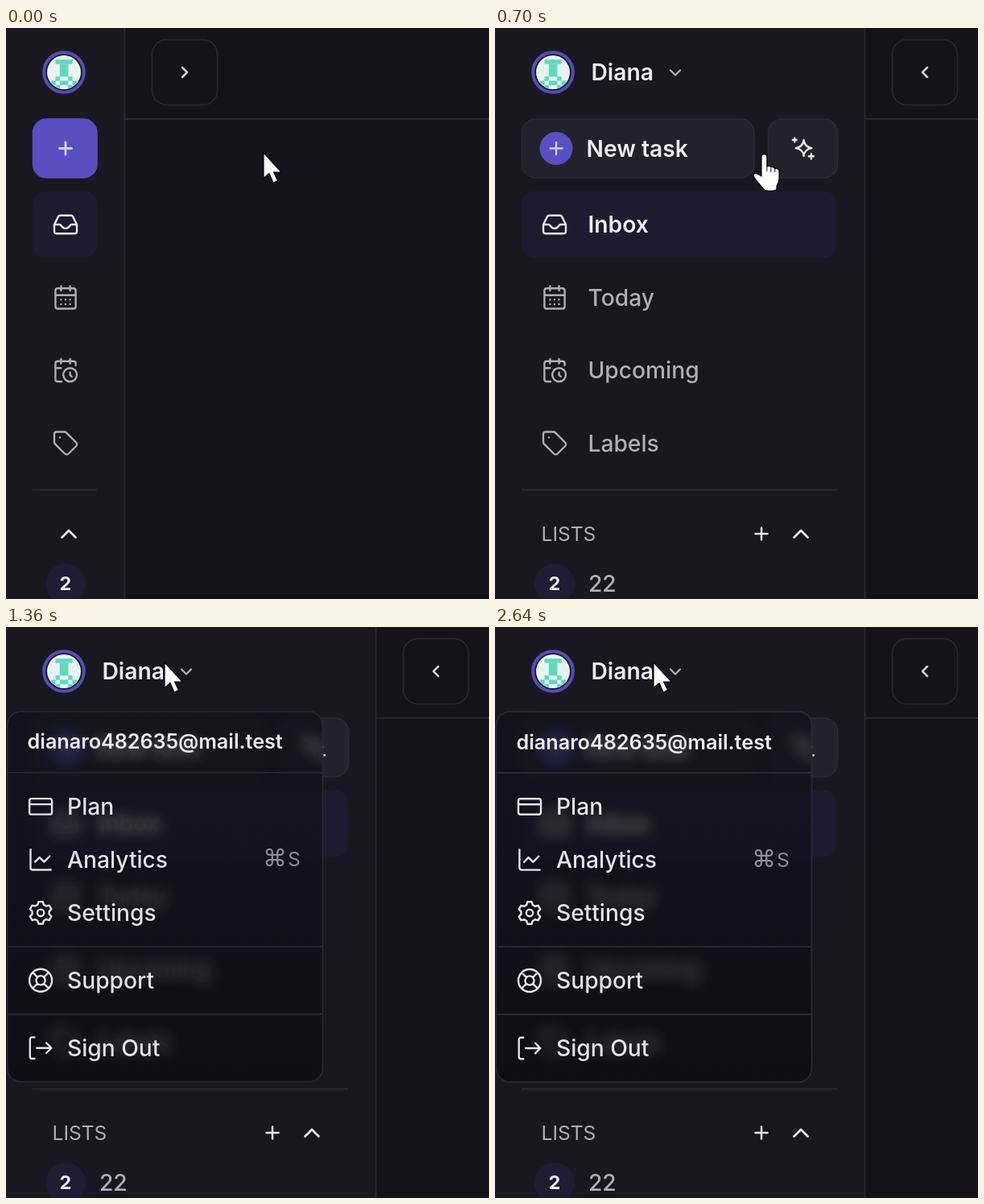
Animation of 600 by 709 pixels, one loop 2670 ms. Source, as an HTML page:

```html
<!DOCTYPE html>
<html lang="en">
<head>
<meta charset="utf-8">
<title>Sidebar</title>
<style>
html, body { margin: 0; width: 100%; height: 100%; overflow: hidden; background: #14131b; }
svg { display: block; width: 100vw; height: 100vh; }
text { font-family: Inter, "Noto Sans", sans-serif; font-size: 28.2px; font-weight: 500; fill: #b0afb8; white-space: pre; }
.hi { fill: #ececf1; }
.bold { font-weight: 600; }
.line { stroke: #2a2934; stroke-width: 1.8; }
.ico { fill: none; stroke: #b0afb8; stroke-width: 1.7; stroke-linecap: round; stroke-linejoin: round; }
.lit { stroke: #e6e6ec; }
.small { font-size: 24.6px; font-weight: 400; }
.card { fill: #24222d; stroke: #2b2a36; stroke-width: 1.5; }
</style>
</head>
<body>
<svg viewBox="0 0 600 709" preserveAspectRatio="none">
  <defs>
    <clipPath id="face"><circle r="21"/></clipPath>
    <clipPath id="panel"><rect x="1" y="105" width="393" height="460" rx="17"/></clipPath>
    <filter id="blur" filterUnits="userSpaceOnUse" x="0" y="0" width="600" height="709"><feGaussianBlur stdDeviation="7"/></filter>
    <linearGradient id="shade" gradientUnits="userSpaceOnUse" x1="0" x2="0" y1="105" y2="565">
      <stop stop-color="#12111a"/><stop offset=".5" stop-color="#110f18"/><stop offset="1" stop-color="#0d0c14"/>
    </linearGradient>
  </defs>
  <rect width="600" height="709" fill="#14131b"/>
  <g id="side">
    <rect id="bar" height="709" fill="#191821"/>
    <line id="edge" class="line" y2="709"/>
    <line id="head" class="line" x2="600" y1="113" y2="113"/>
    <rect id="hover" x="33" y="14" width="219.5" height="82.5" rx="15" fill="#282633"/>
    <g id="avatar"></g>
    <circle id="dot" cy="55" fill="none" stroke="#554db5" stroke-width="4"/>
    <g id="name" class="open">
      <text class="hi bold" y="65">Diana</text>
      <path class="ico" style="stroke-width:2.3" d="M98.5 52.5l6 6 6-6"/>
    </g>
    <rect id="task" x="33.5" y="113" height="73" rx="17" stroke-width="1.5"/>
    <circle class="open" cx="76" cy="149.5" r="20.5" fill="#594fc1"/>
    <path id="plus" class="ico" style="stroke:#d5d1f3" d="M-7.5 0h15M0 -7.5v15"/>
    <text class="hi bold open" x="113.5" y="159.5">New task</text>
    <g id="spark" class="open">
      <rect class="card" y="113" width="86" height="73" rx="17"/>
      <path class="ico lit" transform="translate(43.5 149.5) scale(1.4) translate(-12 -12)"
        d="M12.4 4.5q.8 6.2 7 7.2-6.2 .8-7 7-.8-6.2-7-7 6.2-1 7-7.2zM4.3 2.8v3.4M2.6 4.5h3.4M19 16.8v4.4M16.8 19h4.4"/>
    </g>
    <rect id="inbox" x="33" y="202.5" height="83" rx="17" fill="#1e1b30"/>
    <g id="rows"></g>
    <line id="rule" class="line" x1="33" y1="573.5" y2="573.5"/>
    <text class="small open" x="57.5" y="636.5">LISTS</text>
    <path id="add" class="ico lit open" style="stroke-width:2.5" d="M-7.5 0h15M0 -7.5v15"/>
    <path id="fold" class="ico lit" style="stroke-width:2.8" d="M-8.5 4.5l8.5-8.5 8.5 8.5"/>
    <circle cx="74" cy="690" r="25" fill="#1f1c33"/>
    <text class="hi" x="74" y="698" text-anchor="middle" style="font-size:23.5px;font-weight:700">2</text>
    <text class="open" x="116" y="700">22</text>
  </g>
  <g id="toggle">
    <rect x="34" y="14.5" width="81" height="81" rx="18" fill="none" stroke="#282731" stroke-width="1.8"/>
    <path id="arrow" class="ico" style="stroke:#d0d0d7;stroke-width:2.5" d="M-3 -6l6 6-6 6"/>
  </g>
  <g id="menu">
    <g clip-path="url(#panel)">
      <rect width="600" height="709" fill="#191821"/>
      <use href="#side" filter="url(#blur)"/>
      <rect width="600" height="709" fill="url(#shade)" opacity=".77"/>
    </g>
    <rect x="1.5" y="105" width="392" height="460" rx="17" fill="none" class="line"/>
    <path class="line" d="M2 181h391M2 397h391M2 481h391"/>
    <text class="hi bold" x="26.5" y="151.5" style="font-size:25.2px">dianaro482635@mail.test</text>
    <text class="small" y="297.5" style="fill:#8f8e98"><tspan x="319" style="font-size:30px">⌘</tspan><tspan x="350">S</tspan></text>
    <g id="items"></g>
  </g>
  <g id="cursor" stroke-linejoin="round">
    <path id="pointer" d="M0 -2V29.5L7 23.5 12 35 17.5 32.5 12.5 22H22Z" fill="#fff" stroke="#0b0b10" stroke-width="1.2"/>
    <g id="hand">
      <path fill="#fff" stroke="#0b0b10" stroke-width="1.2" d="M11 27V3a3.4 3.4 0 0 1 6.8 0V15q3-1.8 5 1 3.2-1.2 4.8 1.6 4.6-1 5.4 3.2v9q0 5-3 9v3.5q0 3-8.5 3-7 0-9-3.5-4-5-9-11-3.5-5-1.8-6.5 2.6-2 9.3 2.7z"/>
      <path fill="none" stroke="#33323c" stroke-width="1.2" d="M17.8 15v6M22.8 17v5M27.6 18v4"/>
    </g>
  </g>
</svg>
<script>
const LOOP = 2670, OPEN = 296, OPEN_MS = 365, CLICK = 1240;
const $ = id => document.getElementById(id);
const set = (id, attrs) => { for (const k in attrs) $(id).setAttribute(k, attrs[k]); };
const show = (el, on) => { el.style.display = on ? "" : "none"; };
const ramp = (t, a, b) => Math.min(1, Math.max(0, (t - a) / (b - a)));
const mix = (a, b, k) => a + (b - a) * k;

// cubic-bezier(.4, 0, .2, 1)
function ease(x) {
  let lo = 0, hi = 1;
  for (let i = 0; i < 24; i++) {
    const s = (lo + hi) / 2, r = 1 - s;
    if (1.2 * s * r * r + 0.6 * s * s * r + s * s * s < x) lo = s; else hi = s;
  }
  return lo * lo * (3 - 2 * lo);
}

const ring = (x, y, r) => `M${x - r} ${y}a${r} ${r} 0 1 0 ${2 * r} 0a${r} ${r} 0 1 0 ${-2 * r} 0`;

function gear() {
  const pts = [];
  for (let i = 0; i < 6; i++)
    for (const [off, r] of [[-21, 7.6], [-11, 10], [11, 10], [21, 7.6]]) {
      const a = (i * 60 + off) * Math.PI / 180;
      pts.push((12 + r * Math.sin(a)).toFixed(2) + " " + (12 - r * Math.cos(a)).toFixed(2));
    }
  return "M" + pts.join("L") + "Z" + ring(12, 12, 3);
}

const dots = [14, 18].map(y => [8, 12, 16].map(x => `M${x} ${y}h.01`).join("")).join("");
const spokes = [[1, 1], [1, -1], [-1, 1], [-1, -1]]
  .map(([x, y]) => `M${12 + 2.83 * x} ${12 + 2.83 * y}L${12 + 7.07 * x} ${12 + 7.07 * y}`).join("");
const icons = {
  inbox: "M2 12h4.5c2 0 2 3.5 5.5 3.5s3.5-3.5 5.5-3.5H22M5.45 5.11 2 12v6a2 2 0 0 0 2 2h16a2 2 0 0 0 2-2v-6l-3.45-6.89A2 2 0 0 0 16.76 4H7.24a2 2 0 0 0-1.79 1.11z",
  days: "M8 2v4M16 2v4M5 4h14a2 2 0 0 1 2 2v14a2 2 0 0 1-2 2H5a2 2 0 0 1-2-2V6a2 2 0 0 1 2-2zM3 10h18" + dots,
  clock: "M21 7.5V6a2 2 0 0 0-2-2H5a2 2 0 0 0-2 2v14a2 2 0 0 0 2 2h3.5M16 2v4M8 2v4M3 10h5M17.5 17.5 16 16.3V14" + ring(16, 16, 6),
  tag: "M12.59 2.59A2 2 0 0 0 11.17 2H4a2 2 0 0 0-2 2v7.17a2 2 0 0 0 .59 1.41l8.7 8.7a2.43 2.43 0 0 0 3.42 0l6.58-6.58a2.43 2.43 0 0 0 0-3.42zM7 7h.01",
  card: "M4 5h16a2 2 0 0 1 2 2v10a2 2 0 0 1-2 2H4a2 2 0 0 1-2-2V7a2 2 0 0 1 2-2zM2 10h20",
  chart: "M3 3v16a2 2 0 0 0 2 2h16M20 9l-5 5-4-4-4 4",
  gear: gear(),
  buoy: ring(12, 12, 10) + ring(12, 12, 4) + spokes,
  exit: "M6.5 21.5H4.5a2 2 0 0 1-2-2v-15a2 2 0 0 1 2-2H6.5M17 7.5 21.5 12l-4.5 4.5M8.5 12h13"
};

const icon = (d, x, y, cls) =>
  `<path class="ico ${cls}" transform="translate(${x} ${y}) scale(1.4) translate(-12 -12)" d="${d}"/>`;

$("rows").innerHTML = [["inbox", "Inbox", 244], ["days", "Today", 334.5], ["clock", "Upcoming", 425], ["tag", "Labels", 515.5]]
  .map(([k, s, y], i) => icon(icons[k], 74, y, i ? "" : "lit") +
    `<text class="open ${i ? "" : "hi bold"}" x="115.5" y="${y + 10.3}">${s}</text>`).join("");

$("items").innerHTML = [["card", "Plan", 223], ["chart", "Analytics", 289], ["gear", "Settings", 355], ["buoy", "Support", 439], ["exit", "Sign Out", 523]]
  .map(([k, s, y]) => icon(icons[k], 43, y, "lit") +
    `<text x="76" y="${y + 10.3}" style="fill:#e4e4ea">${s}</text>`).join("");

const face = ["........", "..####..", "...##...", "...##...", "...##...", "..#..#..", ".#.##.#.", "..#..#.."];
$("avatar").innerHTML = '<circle r="24.8" fill="#191821" stroke="#554db5" stroke-width="4"/><circle r="21" fill="#e8f3f0"/>' +
  '<g clip-path="url(#face)" fill="#5fd8be">' + face.map((row, j) => [...row].map((c, i) => c === "#"
    ? `<rect x="${i * 5.25 - 21}" y="${j * 5.25 - 21}" width="5.4" height="5.4"/>` : "").join("")).join("") + "</g>";

const opened = [...document.querySelectorAll(".open")];

function draw(t) {
  const open = t >= OPEN;
  const p = ease(ramp(t, OPEN, OPEN + OPEN_MS));
  const edge = 148 + 312 * p, right = edge - 35;
  for (const el of opened) show(el, open);

  set("bar", { width: edge });
  set("edge", { x1: edge - 0.5, x2: edge - 0.5 });
  set("head", { x1: edge });
  set("inbox", { width: right - 33 });
  set("rule", { x2: right });
  set("toggle", { transform: `translate(${edge - 0.5} 0)` });
  const shrink = 1 - 0.25 * Math.sin(Math.PI * p);
  set("arrow", { transform: `translate(74.5 55) rotate(${180 * p}) scale(${shrink})` });

  // the avatar is squeezed by the name until there is room
  const size = open ? Math.min(53, Math.max(0, right - 183)) : 53;
  const tiny = size < 20;
  show($("avatar"), !tiny);
  show($("dot"), tiny && size > 4);
  set("avatar", { transform: `translate(${45.5 + size / 2} 55) scale(${size / 53})` });
  set("dot", { cx: 45 + size / 2, r: Math.max(0, size / 2 - 2) });
  set("name", { transform: `translate(${66.5 + size} 0)` });

  const stretch = Math.pow(p, 0.713);
  const taskEnd = 113 + 209 * stretch, sparkX = taskEnd + 17.5;
  const tint = ramp(t, OPEN, OPEN + 190);
  const rgb = (a, b) => `rgb(${a.map((v, i) => Math.round(mix(v, b[i], tint)))})`;
  set("task", { width: taskEnd - 33.5, fill: rgb([89, 79, 193], [35, 33, 44]), stroke: rgb([89, 79, 193], [43, 42, 54]) });
  set("plus", { transform: `translate(${open ? 76 : 74} 149.5)` });
  $("plus").style.strokeWidth = open ? 2.3 : 2.8;
  set("spark", { transform: `translate(${sparkX} 0)` });

  const fold = open ? Math.max(195, right - 45) : 78;
  set("fold", { transform: `translate(${fold} 628)` });
  set("add", { transform: `translate(${fold - 49} 628)` });

  const go = ramp(t, 850, 990), k = go * go * (3 - 2 * go);
  const x = mix(320, 197, k), y = mix(157, 46, k);
  const inRow = y > 113 && y < 186;
  const hand = open && t < CLICK &&
    ((inRow && (x < taskEnd || (x > sparkX && x < sparkX + 86))) || (x < 252 && y < 97));
  set("cursor", { transform: `translate(${x} ${y})` });
  show($("hand"), hand);
  show($("pointer"), !hand);
  set("hover", { opacity: ramp(t, 930, 1000) - ramp(t, 1280, 1360) });

  const m = ease(ramp(t, CLICK, CLICK + 140));
  show($("menu"), m > 0);
  set("menu", {
    opacity: m,
    transform: `translate(197 ${105 - 4.5 * (1 - m)}) scale(${mix(0.95, 1, m)}) translate(-197 -105)`
  });
}

const start = performance.now();
function tick() {
  draw((performance.now() - start) % LOOP);
  requestAnimationFrame(tick);
}
draw(0);
requestAnimationFrame(tick);
</script>
</body>
</html>
```
